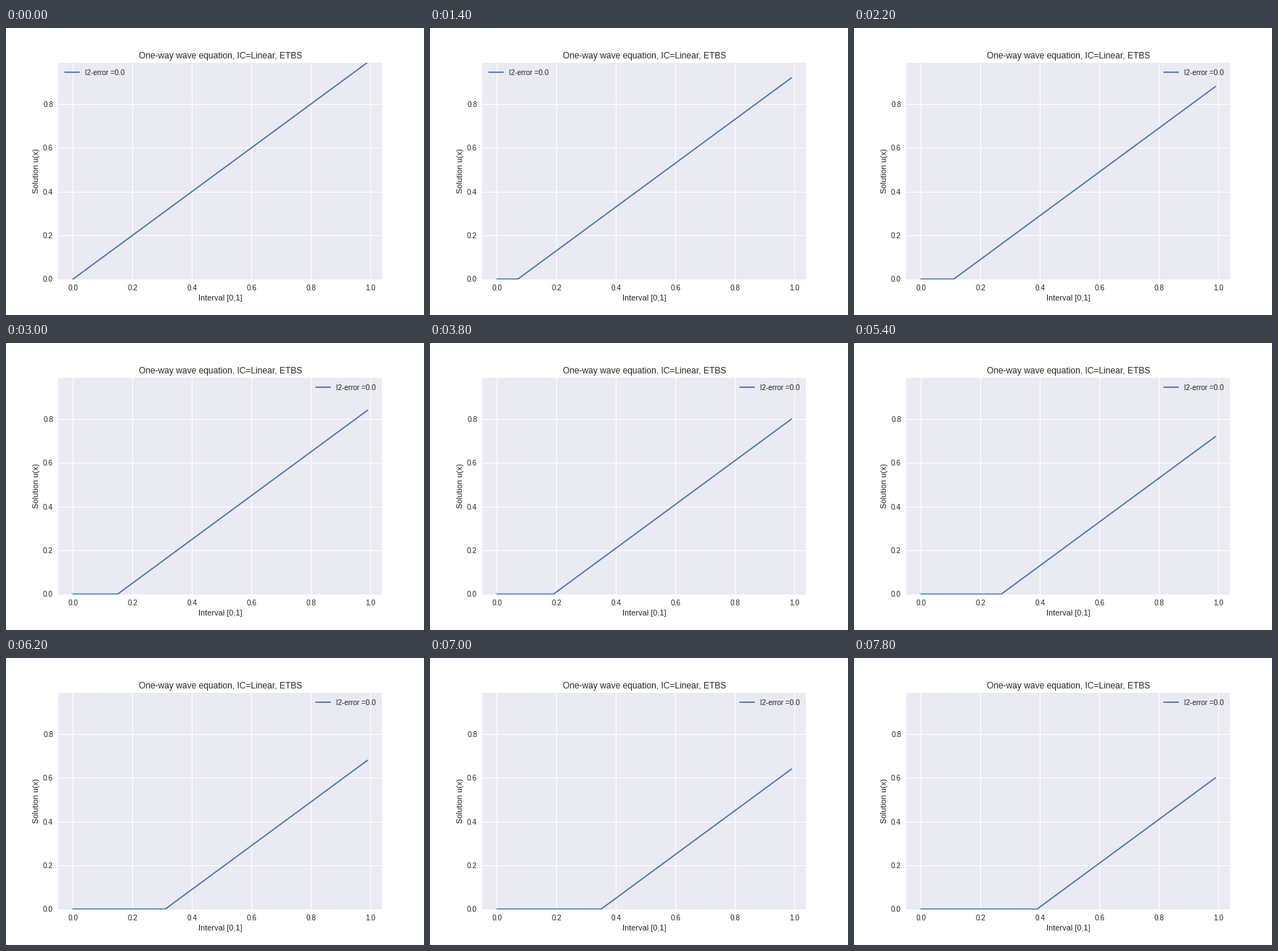
A matplotlib script that plays this animation: 576 by 396 pixels, repeating every 8 s.

```python
import numpy as np
import matplotlib.pyplot as plt
from matplotlib.animation import FuncAnimation

STEPS = 40
DX = 0.01

plt.style.use("seaborn-v0_8")
plt.rcParams["font.family"] = "Liberation Sans"

fig, ax = plt.subplots(figsize=(8, 5.5), dpi=72)
fig.subplots_adjust(left=0.125, right=0.9, bottom=0.125, top=0.88)

x = np.arange(100) * DX
margin = 0.05 * x[-1]


def wave(step):
    """Linear profile carried to the right, with zero inflow at the left edge."""
    return np.maximum(x - step * DX, 0)


line, = ax.plot(x, wave(0), label="l2-error =0.0")
ax.set_xlim(-margin, x[-1] + margin)
ax.set_ylim(0, x[-1])
ax.set_xticks(np.arange(6) * 0.2)
ax.set_yticks(np.arange(5) * 0.2)
ax.set_title("One-way wave equation, IC=Linear, ETBS")
ax.set_xlabel("Interval [0,1]")
ax.set_ylabel("Solution u(x)")


def update(step):
    line.set_ydata(wave(step))
    # The legend moves right once the line has cleared that corner.
    ax.legend(loc="upper left" if step < 8 else "upper right")
    return line,


anim = FuncAnimation(fig, update, frames=STEPS, interval=200,
                     repeat=True, repeat_delay=0, blit=False)
plt.show()
```
